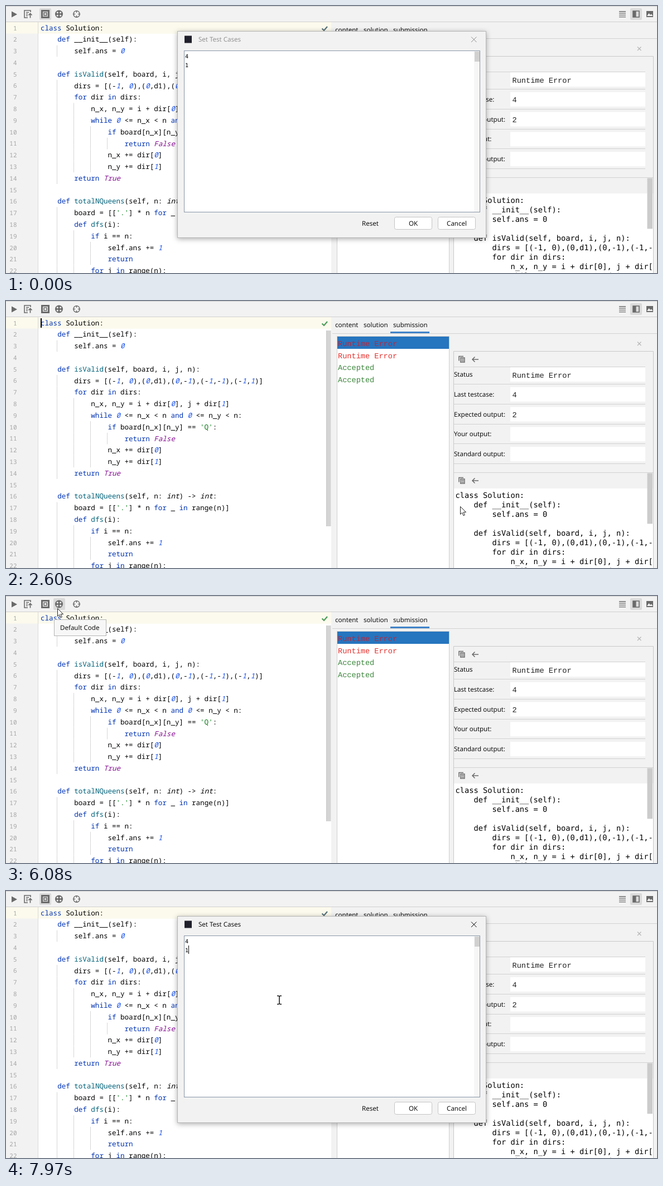
Animation of 1167 by 480 pixels, one loop 8000 ms. Source, as an HTML page:

```html
<!DOCTYPE html>
<html lang="en">
<head>
<meta charset="utf-8">
<title>Code practice plugin</title>
<style>
  html, body { margin: 0; width: 100%; height: 100%; overflow: hidden; background: #f2f2f2; }
  svg { display: block; width: 100vw; height: 100vh; }
  text { white-space: pre; text-rendering: geometricPrecision; }
  .ui { font: 11.6px "Open Sans", "Noto Sans CJK SC", "Noto Sans CJK", sans-serif; }
  .code { font: 12.55px "Noto Sans Mono", monospace; }
  .gutter { font: 11px "Noto Sans Mono", monospace; }
  .plain { font: 13.7px "DejaVu Sans Mono", monospace; }
  .field { font: 13.6px "Liberation Mono", monospace; }
  .input { font: 10px "DejaVu Sans Mono", monospace; }
  .kw { fill: #0033b3; }
  .num { fill: #1750eb; font-style: italic; }
  .const { fill: #871094; font-style: italic; }
  .type { font-style: italic; }
  .fn { fill: #00627a; }
  .str { fill: #067d17; }
  .window { filter: drop-shadow(0 2px 5px rgba(0, 0, 0, .32)); }
</style>
</head>
<body>
<svg id="stage" viewBox="0 0 1167 480" preserveAspectRatio="none"></svg>
<script>
const LOOP = 8000;
const SOURCE = `class Solution:
    def __init__(self):
        self.ans = 0

    def isValid(self, board, i, j, n):
        dirs = [(-1, 0),(0,d1),(0,-1),(-1,-1),(-1,1)]
        for dir in dirs:
            n_x, n_y = i + dir[0], j + dir[1]
            while 0 <= n_x < n and 0 <= n_y < n:
                if board[n_x][n_y] == 'Q':
                    return False
                n_x += dir[0]
                n_y += dir[1]
        return True

    def totalNQueens(self, n: int) -> int:
        board = [['.'] * n for _ in range(n)]
        def dfs(i):
            if i == n:
                self.ans += 1
                return
            for j in range(n):`.split('\n');

// Markup helpers
const escapeText = s => s.replace(/&/g, '&amp;').replace(/</g, '&lt;');
const rect = (x, y, w, h, fill, more = '') =>
  `<rect x="${x}" y="${y}" width="${w}" height="${h}" fill="${fill}" ${more}/>`;
const path = (d, stroke, width = 1, more = '') =>
  `<path d="${d}" fill="none" stroke="${stroke}" stroke-width="${width}" ${more}/>`;
const rawText = (x, y, markup, cls, fill = '#000', more = '') =>
  `<text x="${x}" y="${y}" class="${cls}" fill="${fill}" ${more}>${markup}</text>`;
const text = (x, y, s, ...rest) => rawText(x, y, escapeText(s), ...rest);
const group = (id, body, more = '') => `<g id="${id}" ${more}>${body}</g>`;
const hoverBox = (id, x, y, size = 21) => rect(x, y, size, size, '#dadada', `id="${id}" rx="2"`);

const TOKEN = /(?<str>'[^']*')|(?<fn>(?<=def )[a-z]\w+)|\b(?:(?<kw>class|def|for|in|if|while|and|return)|(?<const>True|False)|(?<type>int)|(?<num>\d+))\b/g;

function highlight(line) {
  let html = '', end = 0;
  for (const match of line.matchAll(TOKEN)) {
    const cls = Object.keys(match.groups).find(name => match.groups[name]);
    html += escapeText(line.slice(end, match.index)) + `<tspan class="${cls}">${match[0]}</tspan>`;
    end = match.index + match[0].length;
  }
  return html + escapeText(line.slice(end));
}

function toolbar() {
  const ink = '#6a6a6a';
  const dots = [[92.3, 11.8], [97.7, 11.8], [92.3, 17.2], [97.7, 17.2]]
    .map(([x, y]) => `<circle cx="${x}" cy="${y}" r="1.6" fill="#f2f2f2"/>`).join('');
  return rect(0, 0, 1167, 28, '#f2f2f2') +
    path('M0 .5H1167M0 28.5H1167', '#d1d1d1') +
    hoverBox('casesHover', 60, 4) + hoverBox('defaultHover', 85, 4) +
    hoverBox('layoutHover', 1119, 4) +
    `<path d="M10 9.5L20 15L10 20.5Z" fill="${ink}"/>` +
    path('M44 11V8H33V21H39M36 11.5H41M36 14.5H39M36 17.5H39', ink, 1.6) +
    path('M43.5 21.5V14M40.5 16.5L43.5 13.5L46.5 16.5', ink, 1.7) +
    path('M64.5 8.5H76.5V20.5H64.5Z', ink, 3) + rect(68, 12, 5, 5, 'none', `stroke="${ink}" stroke-width="1.5"`) +
    `<circle cx="95" cy="14.5" r="7" fill="${ink}"/>` + dots +
    `<circle cx="126.5" cy="14.5" r="5.7" fill="none" stroke="${ink}" stroke-width="1.4"/>` +
    path('M126.5 8V12M126.5 17V21M120 14.5H124M129 14.5H133', ink, 1.4) +
    path('M1099 10H1111M1099 13.2H1111M1099 16.4H1111M1099 19.6H1111', ink, 1.3) +
    path('M1124 9H1135V20H1124Z', ink, 1.6) + rect(1124, 9, 5.5, 11, ink) +
    rect(1148, 9, 12, 11, ink) + '<path d="M1149 18L1152.5 13L1155 16L1157 14.5L1159.5 18Z" fill="#f2f2f2"/>';
}

function editor() {
  const step = 20.79, column = 7.53;
  const lines = SOURCE.map((line, i) => {
    const mid = 39.3 + i * step;
    const indent = line.search(/\S/);
    let guides = '';
    for (let col = 4; col < indent; col += 4) {
      const x = Math.floor(61 + col * column) + .5;
      guides += `M${x} ${mid - step / 2}v${step}`;
    }
    return path(guides, '#d6d6d6') +
      text(19.5, mid + 4.2, String(i + 1), 'gutter', '#a6a6a6', 'text-anchor="end"') +
      rawText(62, mid + 4.3, highlight(line), 'code');
  }).join('');
  return rect(0, 29, 57, 451, '#f2f2f2') + rect(57, 29, 526, 451, '#fff') +
    rect(0, 29, 583, 20.7, '#fcfaed') + path('M57.5 29V480', '#d9d9d9') + lines +
    rect(574, 53, 8.5, 352, '#d4d4d4') + path('M574.5 53V405', '#c6c6c6') +
    path('M566.5 40.5L570 44L576 37', '#4b9b59', 2.2, 'id="check"') +
    rect(62, 31, 2, 17, '#000', 'id="caret"');
}

const copyIcon = y => path(`M812 ${y + 3}V${y - 5}H820`, '#6a6a6a', 1.5) +
  path(`M814.8 ${y - 2.5}H822V${y + 5.5}H814.8ZM816 ${y}H821M816 ${y + 3}H821`, '#6a6a6a', 1.4);
const backIcon = y => path(`M847 ${y}H836M840.5 ${y - 4.5}L836 ${y}L840.5 ${y + 4.5}`, '#6a6a6a', 1.5);

function sidePanel() {
  const tabs = [[590, 'content'], [641, 'solution'], [694, 'submission']]
    .map(([x, name]) => text(x, 46.5, name, 'ui')).join('');
  const results = [['Runtime Error', '#b8283c'], ['Runtime Error', '#e5302c'], ['Accepted', '#3c863c'], ['Accepted', '#3c863c']]
    .map(([name, color], i) => text(595, 81 + i * 21.6, name, 'field', color)).join('');
  const rows = [['Status', 'Runtime Error'], ['Last testcase:', '4'], ['Expected output:', '2'], ['Your output:', ''], ['Standard output:', '']]
    .map(([label, value], i) => {
      const y = 119 + i * 35.8;
      return text(803, y + 17, label, 'ui') + rect(904, y, 242, 26, '#fff') +
        text(907.5, y + 18.6, value, 'field', '#222') + path(`M803 ${Math.round(y + 30) + .5}H1146`, '#d1d1d1');
    }).join('');
  const solution = SOURCE.slice(0, 9)
    .map((line, i) => text(805.5, 354 + i * 17, line, 'plain')).join('');
  return rect(583, 29, 584, 451, '#f2f2f2') + path('M585 58.5H1167', '#d1d1d1') + tabs +
    rect(689, 55, 70, 3, '#4083c9') +
    rect(593.5, 63.5, 201, 430, '#fff', 'stroke="#cfcfcf"') + rect(594, 64, 200, 22, '#2675bf') + results +
    path('M1132 73.5L1138.5 80M1138.5 73.5L1132 80', '#b4b4b4', 1.1) +
    path('M802.5 480V90.5H1160.5V480', '#c9c9c9') + path('M803 118.5H1146M803 308.5H1160', '#d1d1d1') +
    hoverBox('copyHover', 807, 95, 20) +
    copyIcon(104.5) + backIcon(105) + rows + copyIcon(322.5) + backIcon(323) +
    rect(803, 337, 357, 143, '#fff') + `<g clip-path="url(#solutionClip)">${solution}</g>` +
    rect(1149.5, 309.5, 9.5, 91, '#cbcbcb');
}

const button = (x, y, w, label) =>
  rect(x + .5, y + .5, w, 22, '#fff', 'rx="3" stroke="#c4c4c4"') +
  text(x + w / 2 + .5, y + 15.5, label, 'ui', '#000', 'text-anchor="middle"');

function casesWindow() {
  return rect(307.5, 45.5, 553, 371, '#f2f2f2', 'class="window" stroke="#b5b5b5"') +
    rect(320, 53.5, 13, 13, '#20202c') +
    text(345, 64, 'Set Test Cases', 'ui', '#000', 'id="casesTitle"') +
    path('M834 55.5L843.5 65M843.5 55.5L834 65', '#000', 1, 'id="casesClose"') +
    rect(319.5, 80.5, 530, 290, '#fff', 'stroke="#8796a6"') +
    rect(839, 81, 10, 289, '#f6f6f6') + rect(840, 82, 9, 18, '#d0d0d0') +
    text(321, 94, '4', 'input') + text(321, 109.5, '1', 'input') +
    rect(327, 98, 1, 15, '#000', 'id="casesCaret"') +
    text(653, 395, 'Reset', 'ui', '#000', 'text-anchor="middle"') +
    button(696, 379, 67, 'OK') + button(774, 379, 67, 'Cancel');
}

function messageWindow() {
  return rect(454, 172, 260, 118.5, '#f2f2f2', 'class="window"') + rect(454, 172, 260, 31, '#fff') +
    text(462, 190.5, '消息', 'ui') +
    '<circle cx="480" cy="226.5" r="14" fill="#389fd6"/>' +
    rect(478.7, 218, 2.8, 10.5, '#fff') + rect(478.7, 231, 2.8, 3, '#fff') +
    text(511, 230, 'Copy Testcase Success', 'ui') +
    rect(549, 252, 70, 23, '#4a89cb', 'rx="3" stroke="#97c3f3" stroke-width="2.5"') +
    text(584, 267.7, '确定', 'ui', '#fff', 'text-anchor="middle"');
}

const tooltip = rect(86.5, 42.5, 93, 29, '#f7f7f7', 'stroke="#b4b4b4"') + text(97, 61, 'Default Code', 'ui');
const arrow = '<path d="M.5 .5V14.5L3.8 11.5L6 16.8L8.3 15.8L6.1 10.7H10.6Z" fill="#fff" stroke="#222"/>';
const beam = path('M-4 -7.5H-1.5L0 -6.5L1.5 -7.5H4M0 -6.5V6.5M-4 7.5H-1.5L0 6.5L1.5 7.5H4', '#111', 1.5);

document.getElementById('stage').innerHTML =
  '<clipPath id="solutionClip"><rect x="803" y="337" width="356" height="143"/></clipPath>' +
  toolbar() + editor() + sidePanel() +
  group('tooltip', tooltip) + group('cases', casesWindow()) + group('message', messageWindow()) +
  group('cursor', group('arrow', arrow) + group('beam', beam));

const $ = id => document.getElementById(id);
const show = (id, visible) => { $(id).style.display = visible ? '' : 'none'; };

// Cursor path: time, x, y
const CURSOR = [
  [130, 1092, 470], [480, 520, 230], [750, 200, 60], [890, 287, 17], [960, 300, 24],
  [1495, 710, 332], [1700, 779, 396], [1780, 792, 413], [1970, 812, 393], [2180, 812, 393],
  [2300, 815, 385], [2589, 814, 369], [2930, 835, 131], [3200, 817, 106], [3480, 817, 106],
  [4150, 575, 276], [4400, 562, 260], [4560, 562, 260], [4638, 519, 191], [5310, 94, 25],
  [5440, 92, 22], [6590, 92, 22], [6860, 55, 20], [7050, 70, 16], [7230, 70, 16],
  [7370, 234, 100], [7438, 402, 158], [7780, 488, 195], [7900, 490, 196], [LOOP, 490, 196]
];
const CARET_ON = [[2250, 2930], [3400, 3560], [4560, 5090], [5600, 6040], [6610, 7100]];

const clamp = v => Math.min(1, Math.max(0, v));
const within = (t, from, to) => t >= from && t < to;

function cursorAt(t) {
  const i = Math.max(1, CURSOR.findIndex(key => key[0] > t));
  const [t0, x0, y0] = CURSOR[i - 1], [t1, x1, y1] = CURSOR[i];
  const p = clamp((t - t0) / (t1 - t0));
  return [x0 + (x1 - x0) * p, y0 + (y1 - y0) * p];
}

// Windows grow while fading in and shrink while fading out.
const fadeIn = (t, start) => 1 - (1 - clamp((t - start) / 300)) ** 3;
const fadeOut = (t, start) => (1 - clamp((t - start) / 150)) ** 2;

function placeWindow(id, opacity, closing) {
  const smallest = closing ? .906 : .95;
  const scale = smallest + (1 - smallest) * opacity;
  show(id, opacity > 0);
  $(id).setAttribute('opacity', opacity);
  $(id).setAttribute('transform', `translate(584 231.5) scale(${scale}) translate(-584 -231.5)`);
}

function draw(time) {
  const t = 130 + Math.floor((time - 130) / 68.3) * 68.3;
  const reopened = t >= 7350;
  const cases = reopened ? fadeIn(t, 7350) : fadeOut(t, 2160);
  const message = t < 4550 ? fadeIn(t, 3550) : fadeOut(t, 4550);
  placeWindow('cases', cases, !reopened);
  placeWindow('message', message, t >= 4550);

  const titleColor = reopened ? '#000' : '#8c8c8c';
  $('casesTitle').setAttribute('fill', titleColor);
  $('casesClose').setAttribute('stroke', titleColor);
  show('casesCaret', reopened);

  const casesActive = t < 2160 || t >= 6900;
  show('casesHover', casesActive);
  $('check').setAttribute('stroke', casesActive ? '#56707a' : '#4b9b59');
  show('defaultHover', within(t, 5370, 6640));
  show('copyHover', within(t, 3100, 3700));
  show('tooltip', within(t, 6000, 6640));
  show('caret', CARET_ON.some(([from, to]) => within(t, from, to)));

  const [x, y] = cursorAt(t);
  const overInput = x > 320 && x < 839 && y > 81 && y < 371;
  const overEditor = x > 57 && x < 574 && y > 29 && message < .5;
  const overCases = x > 307 && x < 861 && y > 45 && y < 417;
  const isBeam = cases > .5 && overCases ? overInput : overEditor;
  show('cursor', t >= 130);
  show('arrow', !isBeam);
  show('beam', isBeam);
  $('cursor').setAttribute('transform', `translate(${x} ${y})`);
}

const start = performance.now();
function tick() {
  draw((performance.now() - start) % LOOP);
  requestAnimationFrame(tick);
}
tick();
</script>
</body>
</html>
```
